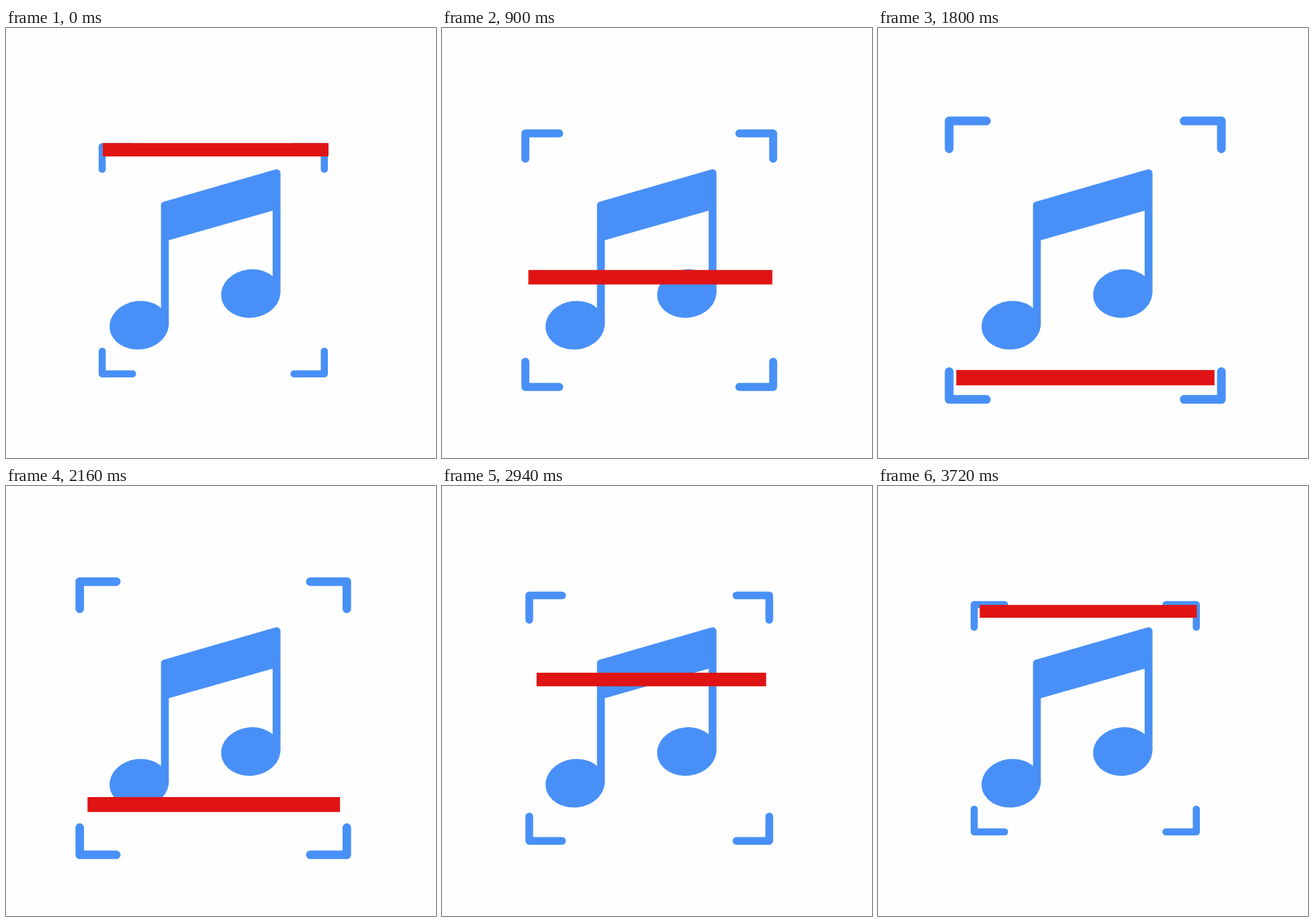
An HTML page for the animation above (3840 ms loop, 640 by 640 pixels).

```html
<!DOCTYPE html>
<html lang="en">
<head>
<meta charset="utf-8">
<title>Music scan</title>
<style>
  html, body { margin: 0; width: 100%; height: 100%; overflow: hidden; background: #fefefe; }
  svg { display: block; width: 100vw; height: 100vh; }
</style>
</head>
<body>
<svg viewBox="0 0 640 640">
  <g fill="#4890f7" stroke="#4890f7" stroke-linejoin="round">
    <path d="M236.5 441V264.2L402.7 216.2V394" fill="none" stroke-width="11.7"/>
    <path d="M236.5 264.2L402.7 216.2V270.3L236.5 317.6Z" stroke="none"/>
    <g stroke="none">
      <ellipse rx="44.25" ry="36.05" transform="translate(198.2 442.4) rotate(-7)"/>
      <ellipse rx="44.25" ry="36.05" transform="translate(364.3 395.2) rotate(-7)"/>
    </g>
    <g id="corners" fill="none" stroke-width="10.6" stroke-linecap="round"></g>
  </g>
  <rect id="bar" fill="#e01414"/>
</svg>
<script>
const LOOP = 3840, STEP = 30, LAST = 3720;
const corners = document.getElementById('corners');
const bar = document.getElementById('bar');

// Four mirrored brackets around the origin
corners.innerHTML = [[-1, -1], [1, -1], [-1, 1], [1, 1]].map(([x, y]) =>
  `<path d="M${x * 120.1} ${y * 169.1}H${x * 165.3}V${y * 135.4}"/>`).join('');

// Keys: [time, ...values]
const frameKeys = [[0, 1], [1770, 1.2257], [3730, 1]];
// centre x, centre y, width
const barKeys = [[0, 312, 181.2, 336], [1680, 308.6, 524, 385], [3660, 312.9, 186.6, 323]];

const smooth = u => u * u * (3 - 2 * u);

function sample(keys, t) {
  const i = t < keys[1][0] ? 0 : 1;
  const [t0, ...a] = keys[i], [t1, ...b] = keys[i + 1];
  const p = smooth(Math.min(1, (t - t0) / (t1 - t0)));
  return a.map((v, k) => v + (b[k] - v) * p);
}

function draw(t) {
  const [scale] = sample(frameKeys, t);
  corners.setAttribute('transform', `translate(308.5 345.6) scale(${scale})`);
  const [x, y, w] = sample(barKeys, t);
  const h = w * 0.0592;
  const box = { x: x - w / 2, y: y - h / 2, width: w, height: h };
  for (const key in box) bar.setAttribute(key, box[key]);
}

const start = performance.now();
function tick() {
  const t = (performance.now() - start) % LOOP;
  draw(Math.min(LAST, Math.floor(t / STEP) * STEP));
  requestAnimationFrame(tick);
}
tick();
</script>
</body>
</html>
```
